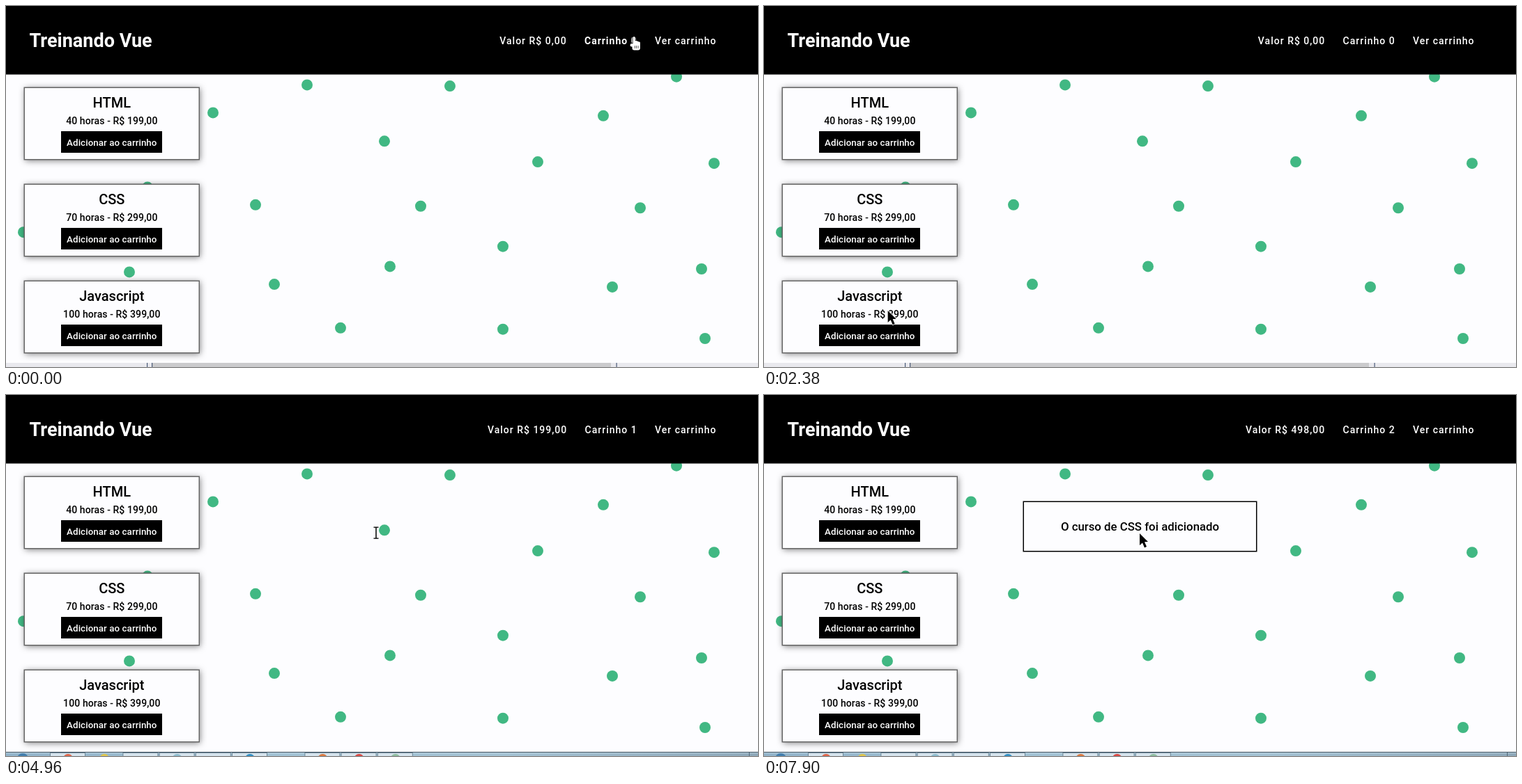
An HTML page with a canvas that plays this animation: 1079 by 519 pixels, repeating every 7.99 s.

```html
<!DOCTYPE html>
<html lang="pt">
<head>
<meta charset="utf-8">
<title>Treinando Vue</title>
<style>
  html, body { margin: 0; width: 100%; height: 100%; overflow: hidden; background: #fdfdff; }
  canvas { display: block; width: 1079px; height: 519px; }
</style>
</head>
<body>
<canvas id="stage" width="1079" height="519"></canvas>
<script>
const ctx = document.getElementById('stage').getContext('2d');
const LOOP = 7990, W = 1079, H = 519;
const PAGE = '#fdfdff', GREEN = '#41b883';
const ADD_HTML = 3440, HIDE_HTML = 4960, ADD_CSS = 6470, TASKBAR = 3240;
const FADE = 300;
const courses = ['HTML', 'CSS', 'Javascript'];

// background rows: height, then the x of each mark; rows slope down slightly
const rows = [
  [94, 962], [110, 432, 637], [151, 297, 857], [190, 543], [218, 763, 1016], [259, 203],
  [283, 358, 595, 910], [325, 25], [340, 713], [370, 551, 998], [381, 177],
  [397, 385, 870], [459, 480, 713], [470, 1003]
];

// pointer moves: start, end, x, y; it rests in between
const moves = [
  [0, 1, 901, 44], [160, 1120, 207, 189], [1250, 1640, 168, 366], [1700, 1880, 169, 326],
  [1900, 2120, 190, 216], [2130, 2450, 176, 468], [2620, 2910, 189, 244],
  [2910, 3260, 190, 196], [3540, 3800, 180, 238], [4340, 4790, 531, 198],
  [5020, 5780, 207, 327], [6840, 7450, 620, 178], [7450, 7900, 539, 199]
];

const clamp = v => Math.max(0, Math.min(1, v));
const smooth = u => u * u * (3 - 2 * u);

// CSS "ease": cubic-bezier(.25, .1, .25, 1)
function ease(x) {
  let lo = 0, hi = 1;
  for (let i = 0; i < 18; i++) {
    const s = (lo + hi) / 2;
    if (0.75 * s * (1 - s) + s ** 3 < x) lo = s; else hi = s;
  }
  const r = 1 - lo;
  return 0.3 * lo * r * r + 3 * lo * lo * r + lo ** 3;
}

function rect(x, y, w, h, color) {
  ctx.fillStyle = color;
  ctx.fillRect(x, y, w, h);
}

function dot(x, y, r, color) {
  ctx.fillStyle = color;
  ctx.beginPath();
  ctx.arc(x, y, r, 0, Math.PI * 2);
  ctx.fill();
}

function setFont(weight, size, spacing = 0) {
  ctx.font = `${weight} ${size}px Roboto, sans-serif`;
  ctx.letterSpacing = spacing + 'px';
}

function text(str, x, y, color, align = 'left') {
  ctx.fillStyle = color;
  ctx.textAlign = align;
  ctx.fillText(str, x, y);
}

function pointer(t) {
  let [, , x, y] = moves[0];
  for (const [start, end, toX, toY] of moves) {
    if (t < start) break;
    const u = smooth(clamp((t - start) / (end - start)));
    x += (toX - x) * u;
    y += (toY - y) * u;
  }
  return { x, y };
}

const onButton = (p, i) => p.x > 79 && p.x < 224 && Math.abs(p.y - 195.5 - i * 139) < 15.5;
const onCart = p => p.x > 829 && p.x < 906 && p.y > 40 && p.y < 60;

// replays the recent pointer path, so the fade depends on time alone
function hoverAmount(i, t) {
  const step = 10;
  let p = 0;
  for (let s = Math.max(0, t - 2 * FADE); s < t; s += step)
    p = clamp(p + (onButton(pointer(s), i) ? step : -step) / FADE);
  return ease(p);
}

function header(t) {
  rect(0, 0, W, 98.5, '#000');
  setFont(700, 27);
  text('Treinando Vue', 33.5, 59, '#fff');
  const count = (t >= ADD_HTML) + (t >= ADD_CSS);
  const total = ['0,00', '199,00', '498,00'][count];
  const gap = 25.3;
  let x = 931 + gap;
  const item = (label, weight, width) => {
    setFont(weight, 14, 1);
    x -= gap + (width ?? ctx.measureText(label).width);
    text(label, x, 55, '#fff');
  };
  item('Ver carrinho', 500, 0);
  item('Carrinho ' + count, onCart(pointer(t)) ? 700 : 500);
  item('Valor R$ ' + total, 500);
}

function card(name, i, t) {
  const y = 116 + i * 139, cx = 151.8;
  ctx.save();
  ctx.shadowColor = 'rgba(0,0,0,.5)';
  ctx.shadowBlur = 9;
  ctx.shadowOffsetX = ctx.shadowOffsetY = 1;
  rect(25.5, y + 0.5, 252.5, 105, '#666');
  ctx.restore();
  rect(27, y + 2, 249.5, 102, PAGE);

  setFont(500, 20);
  text(name, cx, y + 30, '#000', 'center');
  setFont(500, 14, 0.1);
  text(`${40 + 30 * i} horas - R$ ${199 + 100 * i},00`, cx, y + 54, '#000', 'center');

  const h = hoverAmount(i, t), shade = Math.round(26 * h);
  ctx.save();
  ctx.translate(151.5, y + 79.5);
  ctx.scale(1 + 0.1 * h, 1 + 0.1 * h);
  rect(-72.5, -15.5, 145, 31, `rgb(${shade},${shade},${shade})`);
  setFont(500, 13.333, 0.07);
  text('Adicionar ao carrinho', 0.3, 5.3, '#fff', 'center');
  ctx.restore();
}

function message(t) {
  const first = t >= ADD_HTML && t < HIDE_HTML;
  if (!first && t < ADD_CSS) return;
  rect(371.5, 152.5, 336, 73, '#000');
  rect(373, 154, 333, 70, PAGE);
  setFont(500, 16.8);
  text(`O curso de ${first ? 'HTML' : 'CSS'} foi adicionado`, 539.5, 195, '#000', 'center');
}

function scrollStrip() {
  rect(0, 513, W, 6, '#e9e9ee');
  rect(210, 513, 658, 6, '#cbcbcd');
  for (const x of [202, 209, 875.5]) rect(x, 513, 1.2, 6, '#4a5a78');
}

function taskbar() {
  const g = ctx.createLinearGradient(0, 0, W, 0);
  ['#93b4ca', '#a3c3d5', '#a5c3d4', '#8fa9ba'].forEach((c, i) => g.addColorStop(i / 3, c));
  rect(0, 513, W, 6, g);
  rect(0, 513, W, 1.2, '#40525f');
  rect(0, 514.2, W, 0.8, '#c4dbe7');
  const icons = ['#dd6549', '#e2c84d', '', '#8ebccd', '', '#318fc4', '', '#da7940', '#d84843', '#8fbd9f'];
  icons.forEach((color, i) => {
    const x = 64 + i * 52.2;
    if (i % 5 !== 1) {
      rect(x - 1, 514, 51, 5, '#6f8898');
      rect(x, 515, 49, 4, '#d6e4ed');
    }
    if (color) dot(x + 25, 523, 7, color);
  });
  dot(24, 523, 8, '#447fae');
  rect(1066, 514, 1, 5, '#536a79');
}

function arrow() {
  ctx.beginPath();
  for (const [x, y] of [[0, 0], [0, 17], [4, 13.4], [7, 20.4], [10, 19], [7, 12.2], [12, 12]])
    ctx.lineTo(x, y);
  ctx.closePath();
  outline('#000', '#fff');
}

function outline(fill, stroke) {
  ctx.lineWidth = 1.6;
  ctx.lineJoin = 'round';
  ctx.strokeStyle = stroke;
  ctx.stroke();
  ctx.fillStyle = fill;
  ctx.fill();
}

function hand() {
  ctx.beginPath();
  ctx.roundRect(-1.5, 0, 3.2, 13, 1.5);
  for (let i = 0; i < 3; i++) ctx.roundRect(1.6 + i * 2.3, 5.8 + i * 0.8, 2.7, 8, 1.2);
  ctx.roundRect(-2.5, 10, 11.4, 9.5, 3);
  ctx.roundRect(-5.4, 10, 5, 4.5, 2);
  outline('#fff', '#000');
  for (let i = 0; i < 3; i++) rect(0.8 + i * 2.4, 13, 0.8, 4, '#333');
}

function beam() {
  rect(-0.75, -8, 1.5, 16, '#000');
  for (const y of [-8.5, 7.5]) rect(-3.5, y, 7, 1.3, '#000');
}

function cursor(t) {
  const p = pointer(t);
  const shown = t >= ADD_HTML && t < HIDE_HTML + 60 || t >= ADD_CSS;
  const onText = shown && Math.abs(p.x - 539.5) < 115 && Math.abs(p.y - 188) < 10.8;
  const onLink = onCart(p) || courses.some((_, i) => onButton(p, i));
  ctx.save();
  ctx.translate(p.x, p.y);
  (onLink ? hand : onText ? beam : arrow)();
  ctx.restore();
}

function draw() {
  const t = performance.now() % LOOP;
  rect(0, 0, W, H, PAGE);
  for (const [y, ...xs] of rows)
    for (const x of xs) dot(x, y + x * 0.008, 8, GREEN);
  header(t);
  courses.forEach((name, i) => card(name, i, t));
  message(t);
  if (t < TASKBAR) scrollStrip(); else taskbar();
  cursor(t);
  requestAnimationFrame(draw);
}
draw();
</script>
</body>
</html>
```
